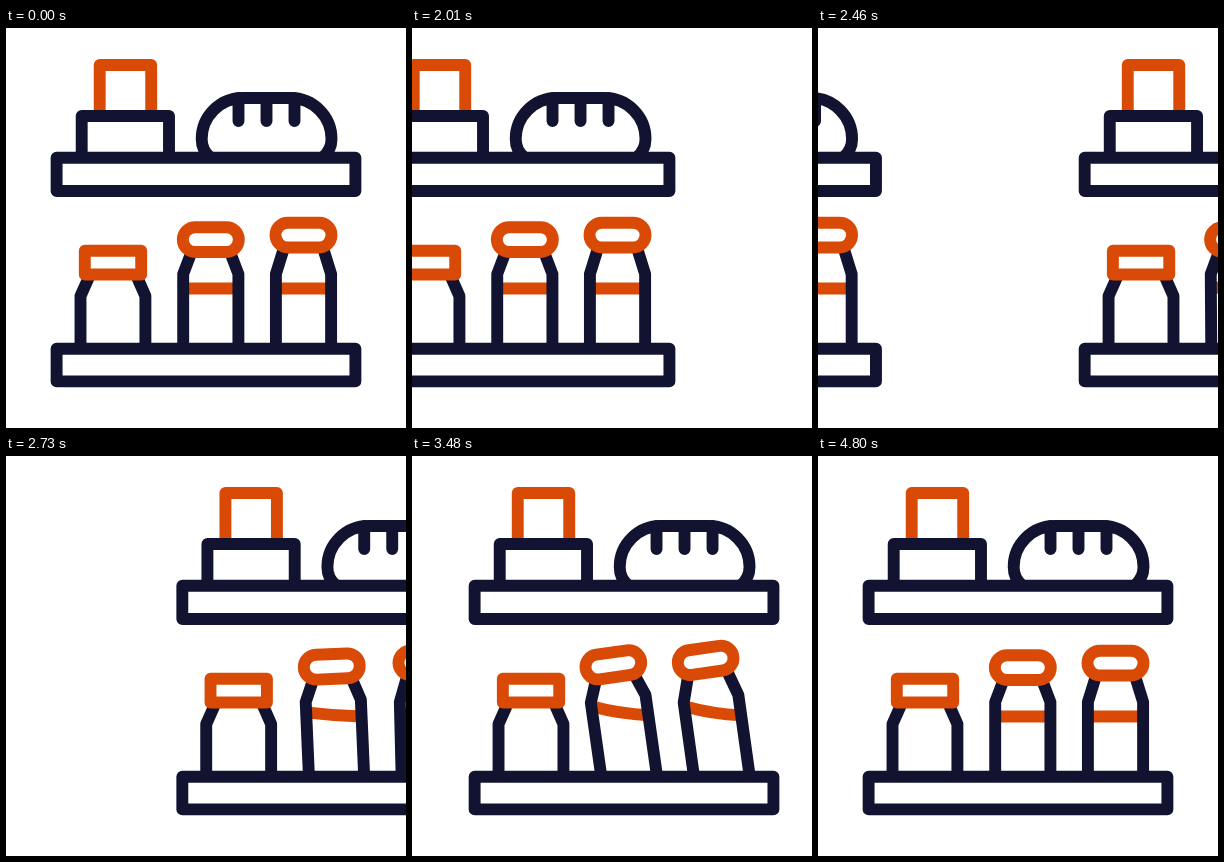
Animation of 400x400 px, one loop 4.83 s. Source, as an HTML page with a canvas:

```html
<!DOCTYPE html>
<html lang="en">
<head>
<meta charset="utf-8">
<title>Pantry shelves</title>
<style>
  html, body { margin: 0; width: 100%; height: 100%; overflow: hidden; background: #fff; }
  canvas { display: block; }
</style>
</head>
<body>
<canvas id="stage" width="400" height="400"></canvas>
<script>
const ctx = document.getElementById('stage').getContext('2d');
const NAVY = '#121331', ORANGE = '#d94a07';
const TICK = 30, TICKS = 161, TRAVEL = 507.5;

const shelves = new Path2D('M50.6 129.7H349.4V163H50.6Z M50.6 320.8H349.4V353.4H50.6Z');
const crate = new Path2D('M75.7 129V88H163V129');
const parcel = new Path2D('M93.7 84V37H145.2V84');
const bread = new Path2D('M204 129C198 124 195.7 118 195.7 111A41 41 0 0 1 236.7 70H284.5A41 41 0 0 1 325.5 111C325.5 118 323 124 317 129');
const cuts = new Path2D('M232.5 70V93 M260.5 70V93 M288.5 70V93');
const jarLid = new Path2D('M78.8 222.7H135.2V246.5H78.8Z');
const jarBody = new Path2D('M83 249L74.5 268V321 M131 249L139.4 268V321');

const smooth = u => u * u * (3 - 2 * u);
const ramp = (n, from, to) => smooth(Math.min(1, Math.max(0, (n - from) / (to - from))));
// Rises from a to b, then falls back by c.
const swing = (n, a, b, c) => ramp(n, a, b) - ramp(n, b, c);

// Cubic bezier easing (1/3, 0, 0.3, 1).
function slide(x) {
  if (x <= 0) return 0;
  if (x >= 1) return 1;
  let lo = 0, hi = 1;
  for (let i = 0; i < 24; i++) {
    const t = (lo + hi) / 2, s = 1 - t;
    if (t * s * s + 0.9 * t * t * s + t ** 3 < x) lo = t; else hi = t;
  }
  return smooth(lo);
}

function stroke(path, color) {
  ctx.strokeStyle = color;
  ctx.stroke(path);
}

// Bottle in local coordinates: the origin is its lower left corner.
function bottle(x, lift, n) {
  const lean = 8.1 * swing(n, 77, 115, 146);
  const slosh = swing(n, 75, 113, 156);
  const level = y => -59.5 + slosh * y;
  const neck = -94 - lift;
  const cap = new Path2D();
  cap.roundRect(-0.4, -120.8 - lift, 56, 24.8, 12.4);
  ctx.save();
  ctx.translate(x, 320);
  ctx.rotate(-lean * Math.PI / 180);
  stroke(new Path2D(`M0 ${level(-11)}Q27.6 ${level(1)} 55.2 ${level(6)}`), ORANGE);
  stroke(new Path2D(`M7.6 ${neck}L0 -74V4 M47.6 ${neck}L55.2 -74V4`), NAVY);
  stroke(cap, ORANGE);
  ctx.restore();
}

function scene(x, n) {
  ctx.save();
  ctx.translate(x, 0);
  stroke(parcel, ORANGE);
  stroke(crate, NAVY);
  stroke(bread, NAVY);
  ctx.lineCap = 'round';
  stroke(cuts, NAVY);
  ctx.lineCap = 'butt';
  stroke(jarBody, NAVY);
  stroke(jarLid, ORANGE);
  bottle(177.2, 0, n);
  bottle(269.9, 4.5, n - 4);
  stroke(shelves, NAVY);
  ctx.restore();
}

function draw(now) {
  const n = Math.floor(now / TICK) % TICKS;
  const p = slide((n - 50) / 80);
  ctx.fillStyle = '#fff';
  ctx.fillRect(0, 0, 400, 400);
  ctx.lineWidth = 11.9;
  ctx.lineJoin = 'round';
  scene(-TRAVEL * p, 0);
  scene(TRAVEL * (1 - p), n);
  requestAnimationFrame(draw);
}
requestAnimationFrame(draw);
</script>
</body>
</html>
```
